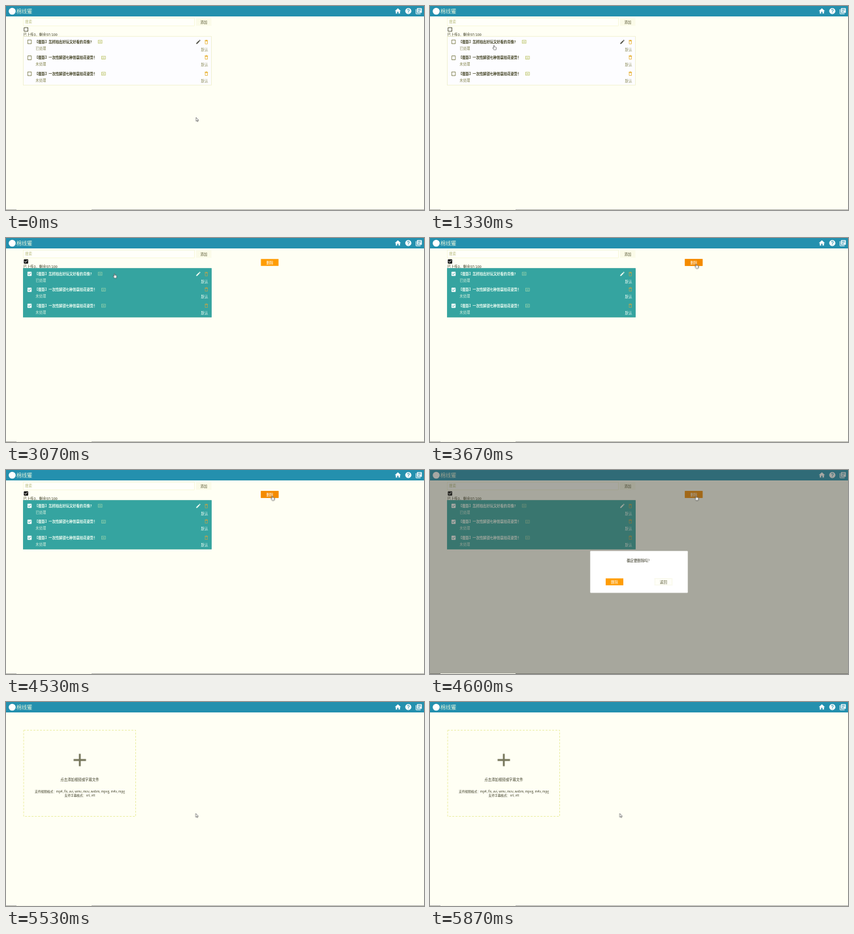
Recreate the animation shown at these times as an HTML page. Size 640 by 313 pixels, loop 6.19 s.

```html
<!DOCTYPE html>
<html lang="zh-CN">
<head>
<meta charset="utf-8">
<title>视频列表批量删除</title>
<style>
  html, body { margin: 0; width: 100%; height: 100%; overflow: hidden; background: #fffff4; }
  svg.stage { display: block; width: 100vw; height: 100vh; }
  text { font: 5.4px "Noto Sans CJK SC", "Noto Sans CJK", sans-serif; }
  .mid { text-anchor: middle; }
  .bold { font-weight: 700; font-size: 5.3px; }
  .small { font-size: 4.7px; }
  .white { fill: #fff; }

  .plain { --panel: #fdfdff; --edge: #efefca; --title: #3c3c1c; --sub: #85854f; --more: #8b8b58;
           --tag: #bcc468; --pen: #505046; --bin: #e6ab20; --box: #66662c; }
  .picked { --panel: #35a4a0; --edge: #35a4a0; --title: #f4fff4; --sub: #d3eedd; --more: #f2fff6;
            --tag: #8fcfab; --pen: #f4fff4; --bin: #b5a452; --box: #fff; }

  .list, .upload, .sel, .modal, .hot, .hot2, .arrow, .hand {
    animation: 6190ms step-end infinite;
  }
  .list { animation-name: list; }
  .upload { animation-name: upload; }
  .sel { animation-name: sel; }
  .modal { animation-name: modal; }
  .hot { animation-name: hot; }
  .hot2 { animation-name: hot2; }
  .hand { animation-name: hand; }
  .arrow { animation-name: arrow; }
  .cursor { animation: move 6190ms infinite; }

  @keyframes list { 0% { opacity: 1 } 89.3%, 100% { opacity: 0 } }
  @keyframes upload { 0% { opacity: 0 } 89.3%, 100% { opacity: 1 } }
  @keyframes sel { 0% { opacity: 0 } 33.38%, 100% { opacity: 1 } }
  @keyframes modal { 0% { opacity: 0 } 74.23% { opacity: 1 } 89.3%, 100% { opacity: 0 } }
  @keyframes hot { 0% { opacity: 0 } 58.15% { opacity: 1 } 75.4%, 100% { opacity: 0 } }
  @keyframes hot2 { 0% { opacity: 0 } 85.05%, 100% { opacity: 1 } }
  @keyframes hand {
    0%, 21.54%, 53.84%, 75.4%, 89.3%, 100% { opacity: 0 }
    16.15%, 25.84%, 58.15%, 85.05% { opacity: 1 }
  }
  @keyframes arrow {
    0%, 21.54%, 53.84%, 75.4%, 89.3%, 100% { opacity: 1 }
    16.15%, 25.84%, 58.15%, 85.05% { opacity: 0 }
  }
  @keyframes move {
    0% { transform: translate(291px, 171px); animation-timing-function: step-end }
    12.92% { transform: translate(291px, 171px); animation-timing-function: steps(3) }
    16.15% { transform: translate(205px, 121px); animation-timing-function: steps(5) }
    21.54% { transform: translate(70px, 45px); animation-timing-function: steps(2) }
    23.69% { transform: translate(36px, 27px); animation-timing-function: steps(3) }
    26.92% { transform: translate(29px, 33px); animation-timing-function: step-end }
    45.23% { transform: translate(29px, 33px); animation-timing-function: steps(4) }
    49.54% { transform: translate(165px, 54.5px); animation-timing-function: steps(6) }
    56% { transform: translate(370px, 43px); animation-timing-function: steps(3) }
    59.23% { transform: translate(406.5px, 39.5px); animation-timing-function: step-end }
    78.62% { transform: translate(406.5px, 39.5px); animation-timing-function: steps(3) }
    81.85% { transform: translate(365px, 95px); animation-timing-function: steps(4) }
    86.16%, 100% { transform: translate(290.5px, 171px); animation-timing-function: step-end }
  }
</style>
</head>
<body>
<svg class="stage" viewBox="0 0 640 313">
  <defs>
    <symbol id="home" viewBox="0 0 24 24"><path d="M10 20v-6h4v6h5v-8h3L12 3 2 12h3v8z"/></symbol>
    <symbol id="help" viewBox="0 0 24 24"><path d="M12 2C6.48 2 2 6.48 2 12s4.48 10 10 10 10-4.48 10-10S17.52 2 12 2zm1 17h-2v-2h2v2zm2.07-7.75l-.9.92C13.45 12.9 13 13.5 13 15h-2v-.5c0-1.1.45-2.1 1.17-2.83l1.24-1.26c.37-.36.59-.86.59-1.41 0-1.1-.9-2-2-2s-2 .9-2 2H8c0-2.21 1.79-4 4-4s4 1.79 4 4c0 .88-.36 1.68-.93 2.25z"/></symbol>
    <symbol id="docs" viewBox="0 0 24 24"><path d="M4 6H2v14c0 1.1.9 2 2 2h14v-2H4zM20 2H8c-1.1 0-2 .9-2 2v12c0 1.1.9 2 2 2h12c1.1 0 2-.9 2-2V4c0-1.1-.9-2-2-2zm-1 9H9V9h10zm-4 4H9v-2h6zm4-8H9V5h10z"/></symbol>
    <symbol id="pen" viewBox="0 0 24 24"><path d="M3 17.25V21h3.75L17.81 9.94l-3.75-3.75zM20.71 7.04c.39-.39.39-1.02 0-1.41l-2.34-2.34c-.39-.39-1.02-.39-1.41 0l-1.83 1.83 3.75 3.75z"/></symbol>
    <symbol id="bin" viewBox="0 0 24 24"><path d="M6 19c0 1.1.9 2 2 2h8c1.1 0 2-.9 2-2V7H6zM8 9h8v10H8zm7.5-5l-1-1h-5l-1 1H5v2h14V4z"/></symbol>
    <symbol id="off" viewBox="0 0 24 24"><path d="M19 5v14H5V5h14m0-2H5c-1.1 0-2 .9-2 2v14c0 1.1.9 2 2 2h14c1.1 0 2-.9 2-2V5c0-1.1-.9-2-2-2z"/></symbol>
    <symbol id="on" viewBox="0 0 24 24"><path d="M19 3H5c-1.1 0-2 .9-2 2v14c0 1.1.9 2 2 2h14c1.1 0 2-.9 2-2V5c0-1.1-.9-2-2-2zm-9 14l-5-5 1.4-1.4 3.6 3.6 7.6-7.6L19 8z"/></symbol>
    <g id="tag">
      <rect x=".4" y=".4" width="5.8" height="4.4" fill="none" stroke="var(--tag)" stroke-width=".8"/>
      <path d="M1.7 2.2h3.2M1.7 3.4h3.2" stroke="var(--tag)" stroke-width=".6"/>
    </g>
    <g id="row">
      <use href="#bin" x="302.5" y="4" width="8.5" height="8.5" fill="var(--bin)"/>
      <text x="298.5" y="21.6" fill="var(--more)">默认</text>
    </g>
    <g id="rows">
      <rect x="26.5" y="46.7" width="288" height="74.6" fill="var(--panel)" stroke="var(--edge)" stroke-width=".8"/>
      <use href="#row" y="47"/>
      <use href="#row" y="70.5"/>
      <use href="#row" y="95.5"/>
      <use href="#pen" x="290.2" y="50.7" width="8.6" height="8.6" fill="var(--pen)"/>
      <g fill="var(--title)">
        <text class="bold" x="44" y="56.8">【摄影】怎样拍出好玩又好看的肖像?</text>
        <text class="bold" x="44" y="81.2">【摄影】一次性解锁七种创意拍花姿势！</text>
        <text class="bold" x="44" y="105.8">【摄影】一次性解锁七种创意拍花姿势！</text>
      </g>
      <g fill="var(--sub)">
        <text x="45.3" y="66.8">已处理</text>
        <text x="45.3" y="91.2">未处理</text>
        <text x="45.3" y="115.8">未处理</text>
      </g>
      <use href="#tag" x="140.8" y="52.3"/>
      <use href="#tag" x="146" y="76.7"/>
      <use href="#tag" x="146" y="101.3"/>
    </g>
    <g id="offs">
      <use href="#off" x="31.8" y="50.8" width="8.5" height="8.5"/>
      <use href="#off" x="31.8" y="75.2" width="8.5" height="8.5"/>
      <use href="#off" x="31.8" y="99.8" width="8.5" height="8.5"/>
    </g>
    <g id="ons">
      <use href="#on" x="31.8" y="50.8" width="8.5" height="8.5"/>
      <use href="#on" x="31.8" y="75.2" width="8.5" height="8.5"/>
      <use href="#on" x="31.8" y="99.8" width="8.5" height="8.5"/>
    </g>
  </defs>

  <rect width="640" height="313" fill="#fffff4"/>
  <rect y="312" width="640" height="1" fill="#b2b2aa"/>

  <rect width="640" height="16" fill="#2490ae"/>
  <circle cx="9.5" cy="8" r="5.3" class="white"/>
  <text x="16" y="10.9" style="font-size:8px" fill="#e6f4dc">棉线獾</text>
  <g class="white">
    <use href="#home" x="594.4" y="2.2" width="11.2" height="11.2"/>
    <use href="#help" x="610.4" y="2.2" width="11.2" height="11.2"/>
    <use href="#docs" x="626.4" y="2.2" width="11.2" height="11.2"/>
  </g>

  <g class="list">
    <rect x="26.5" y="18.8" width="262" height="11.6" fill="#fffffa" stroke="#f6f6d2" stroke-width=".7"/>
    <text x="29" y="26.4" fill="#b4b878">搜索</text>
    <rect x="291" y="18.8" width="23.5" height="11.6" fill="#fbfbe8"/>
    <text class="mid" x="302.8" y="26.5" fill="#5c5c38">添加</text>
    <use href="#off" x="26.3" y="31.6" width="8.8" height="8.8" fill="#22220e"/>
    <text x="26.3" y="46" fill="#3c3c24">已上传3，剩余97/100</text>
    <g class="plain">
      <use href="#rows"/>
      <use href="#offs" fill="var(--box)"/>
    </g>
    <g class="sel picked">
      <rect x="27.4" y="32.7" width="6.6" height="6.6" fill="#fff"/>
      <use href="#on" x="26.3" y="31.6" width="8.8" height="8.8" fill="#111"/>
      <use href="#rows"/>
      <use href="#ons" fill="var(--box)"/>
      <rect x="390.3" y="32.2" width="27" height="10.6" fill="#ff9d05"/>
      <rect class="hot" x="390.3" y="32.2" width="27" height="10.6" fill="#f48b00"/>
      <text class="mid white" x="403.8" y="39.5">删除</text>
    </g>
  </g>

  <g class="upload">
    <rect x="27" y="43.3" width="171.5" height="132.2" fill="none" stroke="#e9ec9a" stroke-width=".9" stroke-dasharray="3 2"/>
    <path d="M113 79.5v19M103.5 89h19" stroke="#77775c" stroke-width="2.8"/>
    <g class="mid" fill="#3e3e28">
      <text x="113" y="121.2">点击添加视频或字幕文件</text>
      <text class="small" x="113" y="138.6">支持视频格式：mp4, flv, avi, wmv, mov, webm, mpeg, m4v, mpg</text>
      <text class="small" x="113" y="144.8">支持字幕格式：srt, vtt</text>
    </g>
  </g>

  <g class="modal">
    <rect width="640" height="313" fill="#404038" fill-opacity=".46"/>
    <rect x="245.3" y="124.3" width="149.4" height="64.2" rx="1" fill="#fff"/>
    <text class="mid" x="320" y="141.3" fill="#33331f">确定要删除吗？</text>
    <rect x="269" y="166.3" width="27" height="10.6" fill="#ff9d05"/>
    <rect class="hot2" x="269" y="166.3" width="27" height="10.6" fill="#f48b00"/>
    <text class="mid white" x="282.5" y="173.6">删除</text>
    <rect x="344.3" y="166.6" width="26.4" height="10" fill="#fffff8" stroke="#e8e8c4" stroke-width=".7" stroke-dasharray="1 1"/>
    <text class="mid" x="357.5" y="173.6" fill="#55552f">返回</text>
  </g>

  <rect x="16" y="312" width="115" height="1" fill="#f2f2e6"/>

  <g class="cursor" fill="#fff" stroke="#333" stroke-width=".55" stroke-linejoin="round">
    <path class="arrow" d="M0 0V5.8L1.4 4.6 2.3 6.6 3.1 6.2 2.3 4.3H4Z"/>
    <path class="hand" d="M.4.5Q1-.2 1.6.5V2.5L4 3Q4.7 3.2 4.6 4L4.1 7H.8L-1 4.4Q-1.1 3.6-.4 3.7L.4 4.4Z"/>
  </g>
</svg>
</body>
</html>
```
